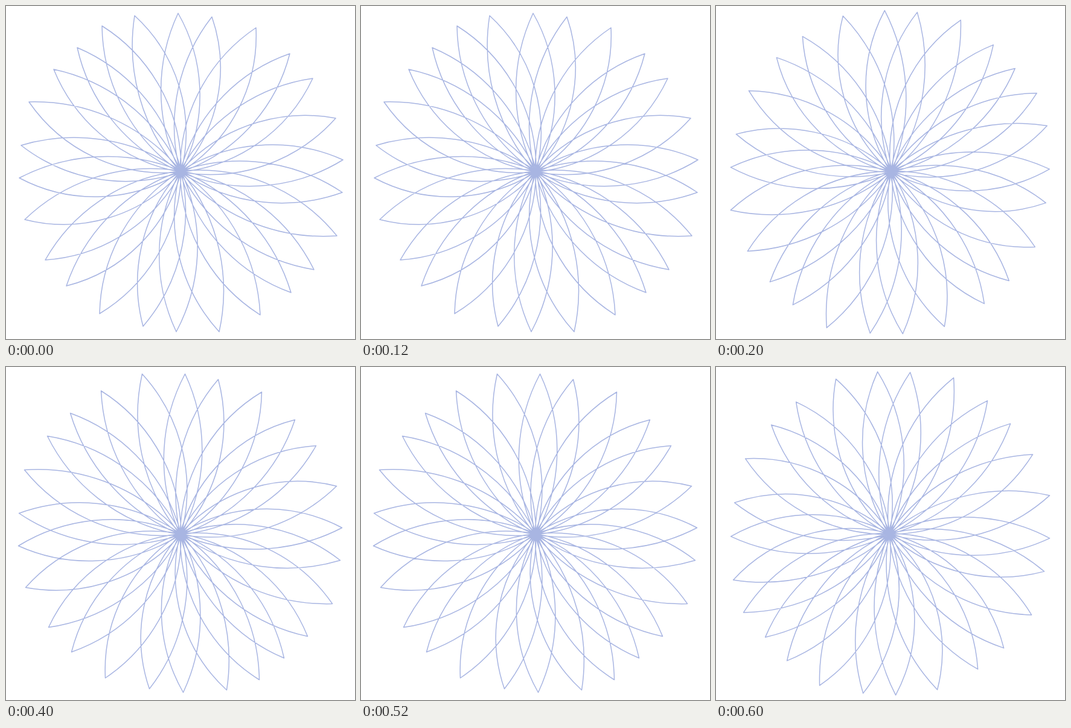
An HTML page that plays this animation: 578 by 552 pixels, repeating every 800 ms.

```html
<!DOCTYPE html>
<html>
<head>
<meta charset="utf-8">
<style>
html, body { margin: 0; width: 100%; height: 100%; overflow: hidden; background: #fff; }
svg { display: block; }
path { fill: none; stroke: #a8b5e2; stroke-width: 1.5; stroke-linejoin: round; }
</style>
</head>
<body>
<svg width="578" height="552" viewBox="0 0 578 552"><path id="flower"/></svg>
<script>
// Petal tips, clockwise from the top
const tips = [
  [285, 12], [341, 18], [414, 36], [470, 79], [508, 120], [546, 186], [558, 255],
  [557, 309], [548, 381], [510, 437], [472, 475], [421, 512], [353, 540],
  [282, 540], [227, 531], [155, 510], [100, 464], [65, 421], [31, 354],
  [22, 285], [25, 231], [38, 159], [79, 105], [118, 69], [159, 33], [213, 16]
];
const hub = [289.25, 274.4], bulge = 0.8, skip = 17, stepMs = 200;
const pivot = [289.25, 275.75];
const shifts = [[0, 0], [-0.7, -1.1], [0, 0], [-0.9, 0.9]];
const flower = document.getElementById('flower');

// Radius of the arc from a to b that passes by the hub
function radius([ax, ay], [bx, by]) {
  const dx = bx - ax, dy = by - ay, len = Math.hypot(dx, dy);
  const sag = Math.abs((hub[0] - ax) * dy - (hub[1] - ay) * dx) / len + bulge;
  return (len * len / 4 + sag * sag) / (2 * sag);
}

let d = 'M' + tips[0];
for (let n = 0; n < tips.length; n++) {
  const a = tips[n * skip % tips.length], b = tips[(n + 1) * skip % tips.length];
  const r = radius(a, b);
  d += `A${r} ${r} 0 0 1 ${b}`;
}
flower.setAttribute('d', d + 'Z');

function draw(now) {
  const turn = Math.floor(now / stepMs) % 4;
  flower.setAttribute('transform', `translate(${shifts[turn]}) rotate(${turn * 90},${pivot})`);
}

let start;
function tick(now) {
  start ??= now;
  draw(now - start);
  requestAnimationFrame(tick);
}
draw(0);
requestAnimationFrame(tick);
</script>
</body>
</html>
```
